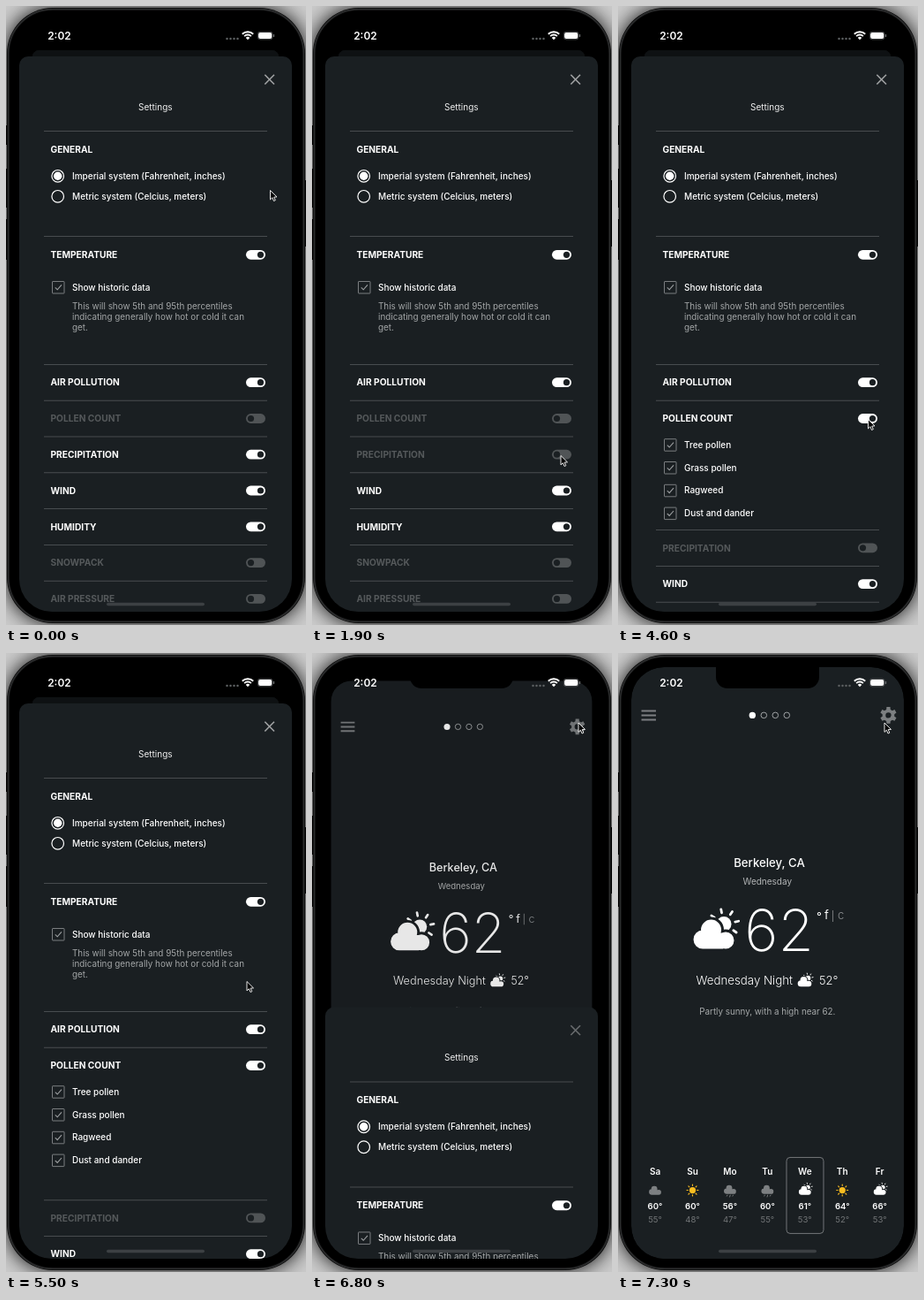
Animation, 340 px wide and 700 px high, one loop 8000 ms. Source, as an HTML page with a canvas:

```html
<!DOCTYPE html>
<html lang="en">
<head>
<meta charset="utf-8">
<title>Weather settings</title>
<style>
  html, body { margin: 0; width: 100%; height: 100%; overflow: hidden; background: #000; }
  canvas { display: block; width: 340px; height: 700px; }
</style>
</head>
<body>
<canvas id="stage"></canvas>
<script>
const W = 340, H = 700, LOOP = 8000, STEP = 100;
const BG = '#1a1f22', LINE = '#484c4f', OFF = '#55595b', GRAY = '#7c7f81', WHITE = '#fff';
const canvas = document.getElementById('stage');
const ctx = canvas.getContext('2d');
const dpr = window.devicePixelRatio || 1;
canvas.width = W * dpr;
canvas.height = H * dpr;

const clamp = v => Math.max(0, Math.min(1, v));
const lerp = (a, b, k) => a + (b - a) * k;
const smooth = k => k * k * (3 - 2 * k);

// Pointer tip: time, x, y
const pointer = [
  [200, 299, 208], [1100, 280, 507], [1300, 281.5, 508], [3800, 281.5, 508],
  [3900, 282, 495], [4000, 283, 479], [4100, 283, 467], [5400, 283, 467],
  [5500, 272.5, 371], [5600, 278, 265], [5700, 287, 175], [5800, 287, 175],
  [6200, 299, 73], [6400, 301.5, 78.5], [8000, 301.5, 78.5]
];
const presses = [[1700, 1900], [4200, 4400], [6600, 6700]];

function pointerAt(t) {
  if (t <= pointer[0][0]) return pointer[0].slice(1);
  const i = pointer.findIndex(p => p[0] >= t);
  const [t0, x0, y0] = pointer[i - 1], [t1, x1, y1] = pointer[i];
  const k = smooth((t - t0) / (t1 - t0));
  return [lerp(x0, x1, k), lerp(y0, y1, k)];
}

// Critically damped spring from 0 to 1
function spring(ms) {
  const u = Math.max(0, ms) * 0.0122;
  return 1 - (1 + u) * Math.exp(-u);
}

function text(s, x, y, size, weight = 500, color = WHITE, align = 'left') {
  ctx.font = `${weight} ${size}px Inter, sans-serif`;
  ctx.textAlign = align;
  ctx.fillStyle = color;
  ctx.fillText(s, x, y + size * 0.364);
}

function roundPath(x, y, w, h, r) {
  ctx.beginPath();
  ctx.roundRect(x, y, w, h, r);
}

function box(x, y, w, h, r, color) {
  roundPath(x, y, w, h, r);
  ctx.fillStyle = color;
  ctx.fill();
}

function disc(x, y, r, color) {
  ctx.beginPath();
  ctx.arc(x, y, r, 0, 7);
  ctx.fillStyle = color;
  ctx.fill();
}

function ring(x, y, r, color, width) {
  ctx.beginPath();
  ctx.arc(x, y, r, 0, 7);
  ctx.strokeStyle = color;
  ctx.lineWidth = width;
  ctx.stroke();
}

function stroke(points, color, width, cap = 'butt') {
  ctx.beginPath();
  points.forEach(([x, y]) => ctx.lineTo(x, y));
  ctx.strokeStyle = color;
  ctx.lineWidth = width;
  ctx.lineCap = cap;
  ctx.stroke();
}

const divider = y => box(43, y - 0.5, 253, 1, 0, LINE);

function toggle(y, on) {
  box(272, y - 5.4, 22, 10.8, 5.4, on ? WHITE : '#505456');
  disc(on ? 288.5 : 277.5, y, 3.6, BG);
}

function section(label, y, on) {
  text(label, 50.5, y, 10.2, 700, on ? WHITE : OFF);
  toggle(y, on);
}

function checkbox(label, y) {
  roundPath(52.5, y - 6.5, 13.5, 13.5, 0.5);
  ctx.strokeStyle = '#7b7e80';
  ctx.lineWidth = 1;
  ctx.stroke();
  stroke([[55.8, y + 0.4], [58.2, y + 2.8], [63, y - 2.6]], '#9b9ea0', 1.1);
  text(label, 75, y, 10);
}

function radio(label, y, on) {
  ring(58.7, y, 6.8, WHITE, 1.2);
  if (on) disc(58.7, y, 4.7, WHITE);
  text(label, 75, y, 10);
}

function drawSettings(t, offset) {
  ctx.save();
  ctx.translate(0, offset);
  box(15, 57, 309, 640, [10, 10, 0, 0], BG);
  const cross = t > 6600 ? '#696c6e' : '#a0a2a3';
  stroke([[293.3, 77.8], [304, 88.5]], cross, 1.6);
  stroke([[304, 77.8], [293.3, 88.5]], cross, 1.6);
  text('Settings', 169.3, 114, 10, 400, '#f0f0f0', 'center');

  divider(141.5);
  text('GENERAL', 50.5, 162, 10.2, 700);
  radio('Imperial system (Fahrenheit, inches)', 192.3, true);
  radio('Metric system (Celcius, meters)', 215.3, false);

  divider(260.5);
  section('TEMPERATURE', 281.3, true);
  checkbox('Show historic data', 318);
  ['This will show 5th and 95th percentiles', 'indicating generally how hot or cold it can', 'get.']
    .forEach((s, i) => text(s, 75, 339 + i * 12.4, 9.9, 400, '#a3a6a7'));

  divider(405.5);
  section('AIR POLLUTION', 425.7, true);
  divider(446.3);
  section('POLLEN COUNT', 466.5, t >= 4400);

  const grow = 131.7 * smooth(clamp((t - 4350) / 350));
  if (grow > 0) {
    ctx.save();
    ctx.beginPath();
    ctx.rect(15, 480, 309, grow + 6);
    ctx.clip();
    ['Tree pollen', 'Grass pollen', 'Ragweed', 'Dust and dander']
      .forEach((s, i) => checkbox(s, 496.2 + i * 25.8));
    ctx.restore();
  }
  const rest = [['PRECIPITATION', t < 1900], ['WIND', true], ['HUMIDITY', true],
    ['SNOWPACK', false], ['AIR PRESSURE', false]];
  rest.forEach(([label, on], i) => {
    const y = 507.2 + grow + i * 40.8;
    divider(y - 20.2);
    section(label, y, on);
  });
  ctx.restore();
}

function cloudPath(pad) {
  ctx.beginPath();
  [[-12.5, 6.5, 10.5], [-3, -4.5, 11.5], [13.5, 7.5, 9.5]].forEach(([x, y, r]) => {
    ctx.moveTo(x + r + pad, y);
    ctx.arc(x, y, r + pad, 0, 7);
  });
  ctx.rect(-12.5, -1 - pad, 23, 18 + 2 * pad);
}

function cloud(color) {
  cloudPath(0);
  ctx.fillStyle = color;
  ctx.fill();
}

function rays(x, y, from, to, count, first, color, width) {
  for (let i = 0; i < count; i++) {
    const a = first + i * Math.PI / 4, c = Math.cos(a), s = Math.sin(a);
    stroke([[x + c * from, y + s * from], [x + c * to, y + s * to]], color, width, 'round');
  }
}

const icons = {
  cloud() { cloud('#7d8082'); },
  rain() {
    ctx.translate(0, -3);
    cloud('#7d8082');
    [-10, 1, 12].forEach((x, i) =>
      stroke([[x, 21], [x - 2, 25 + i % 2 * 3]], '#7d8082', 3, 'round'));
  },
  sun() {
    disc(0, 0, 10, '#fbbd20');
    rays(0, 0, 14.5, 18, 8, 0, '#fbbd20', 3.2);
  },
  partly() {
    disc(11.5, -11, 8.5, WHITE);
    rays(11.5, -11, 13, 17, 5, -2.55, WHITE, 2.8);
    cloudPath(3);
    ctx.fillStyle = BG;
    ctx.fill();
    cloud(WHITE);
  }
};

function icon(name, x, y, scale) {
  ctx.save();
  ctx.translate(x, y);
  ctx.scale(scale, scale);
  icons[name]();
  ctx.restore();
}

function gear(x, y) {
  const tooth = Math.PI / 3;
  ctx.beginPath();
  for (let i = 0; i < 6; i++) {
    const mid = i * tooth + Math.PI / 6;
    [[-0.34, 6.9], [-0.22, 9.5], [0.22, 9.5], [0.34, 6.9]].forEach(([a, r]) =>
      ctx.lineTo(x + Math.cos(mid + a) * r, y + Math.sin(mid + a) * r));
  }
  ctx.closePath();
  ctx.moveTo(x + 3.2, y);
  ctx.arc(x, y, 3.2, 0, 7, true);
  ctx.fillStyle = GRAY;
  ctx.fill('evenodd');
}

const week = [
  ['Sa', 'cloud', 60, 55], ['Su', 'sun', 60, 48], ['Mo', 'rain', 56, 47], ['Tu', 'rain', 60, 55],
  ['We', 'partly', 61, 53], ['Th', 'sun', 64, 52], ['Fr', 'partly', 66, 53]
];

function drawHome(shown) {
  const scale = lerp(0.906, 1, shown);
  const corner = lerp(9, 37, shown);
  ctx.save();
  ctx.translate(169.5, 378);
  ctx.scale(scale, scale);
  ctx.translate(-169.5, -378);
  box(15, 16, 309, 669, corner, BG);

  [65.3, 70.3, 75.3].forEach(y => box(26.5, y - 1, 16.5, 2, 0, GRAY));
  disc(152.3, 70.3, 3.7, WHITE);
  [165.3, 178.3, 191.3].forEach(x => ring(x, 70.3, 3.3, '#a0a3a5', 1));
  gear(306.5, 70.3);

  text('Berkeley, CA', 171.5, 236.7, 13.2, 500, WHITE, 'center');
  text('Wednesday', 169.3, 258.3, 10, 400, '#b4b6b7', 'center');
  icon('partly', 108.5, 317.5, 1);
  text('62', 182.5, 313.6, 65.5, 200, WHITE, 'center');
  text('°', 225, 298, 13, 400);
  text('f', 234, 296.7, 13, 400);
  box(243, 291, 1, 13, 0, '#77797b');
  text('c', 249, 296.7, 13, 300, '#8d9092');
  text('Wednesday Night', 88.5, 370.5, 13.3, 300);
  icon('partly', 211.5, 371.5, 0.34);
  text('52°', 228, 370.5, 13, 300);
  text('Partly sunny, with a high near 62.', 169.3, 405.7, 9.8, 400, '#a5a8a9', 'center');

  week.forEach(([day, sky, high, low], i) => {
    const x = 42 + i * 42.45;
    text(day, x, 586.8, 10, 600, WHITE, 'center');
    icon(sky, x, 607.6, sky === 'sun' ? 0.36 : 0.3);
    text(high + '°', x, 626, 9.6, 600, WHITE, 'center');
    text(low + '°', x, 641, 9.6, 400, '#717476', 'center');
  });
  roundPath(191, 570.5, 42, 86, 4);
  ctx.strokeStyle = '#74777a';
  ctx.lineWidth = 1;
  ctx.stroke();

  box(15, 16, 309, 669, corner, `rgba(0,0,0,${0.45 * (1 - shown) ** 2})`);
  ctx.restore();
}

function drawPhone() {
  ctx.fillStyle = '#cbcbcb';
  ctx.fillRect(0, 0, W, H);
  ctx.save();
  ctx.shadowColor = 'rgba(0,0,0,0.95)';
  ctx.shadowBlur = 22 * dpr;
  box(1, 2, 338, 696, 52, '#070707');
  ctx.restore();
  [[0, 135, 22], [0, 184, 44], [0, 241, 46], [339, 197, 75]]
    .forEach(([x, y, h]) => box(x, y, 1, h, 0, '#080808'));
  roundPath(2.6, 3.6, 334.8, 692.8, 50.5);
  ctx.strokeStyle = '#2c2d2e';
  ctx.lineWidth = 1.6;
  ctx.stroke();
  box(4.5, 5.5, 331, 689, 48, '#000');
}

function drawStatus() {
  box(111, 12, 117, 28, [0, 0, 13, 13], '#000');
  text('2:02', 47.2, 33.5, 11.9, 600);
  for (let i = 0; i < 4; i++) disc(250.5 + i * 4, 37, 1.25, '#5d6062');
  [[8.8, 1.9], [5.5, 1.8]].forEach(([r, w]) => {
    ctx.beginPath();
    ctx.arc(274, 38, r, -Math.PI * 0.75, -Math.PI * 0.25);
    ctx.strokeStyle = WHITE;
    ctx.lineWidth = w;
    ctx.lineCap = 'butt';
    ctx.stroke();
  });
  ctx.beginPath();
  ctx.moveTo(274, 38.2);
  ctx.arc(274, 38.2, 3.2, -Math.PI * 0.75, -Math.PI * 0.25);
  ctx.fillStyle = WHITE;
  ctx.fill();
  roundPath(285.4, 29.2, 16.6, 8.6, 2.6);
  ctx.strokeStyle = '#56595b';
  ctx.lineWidth = 0.8;
  ctx.stroke();
  box(286.1, 29.9, 15.2, 7.2, 2, WHITE);
  box(303, 32, 1.1, 3, 0.5, '#707375');
}

function drawPointer(t) {
  const [x, y] = pointerAt(t);
  if (presses.some(([a, b]) => t >= a && t < b)) disc(x + 0.5, y + 1, 16.5, 'rgba(160,164,166,0.35)');
  ctx.save();
  ctx.translate(x + 0.5, y + 0.5);
  ctx.beginPath();
  [[0, 0], [0, 10.4], [2.4, 8.2], [4, 12], [5.8, 11.2], [4.2, 7.6], [7.5, 7.4]]
    .forEach(([px, py]) => ctx.lineTo(px, py));
  ctx.closePath();
  ctx.fillStyle = '#000';
  ctx.fill();
  ctx.strokeStyle = WHITE;
  ctx.lineWidth = 0.9;
  ctx.lineJoin = 'round';
  ctx.stroke();
  ctx.restore();
}

function draw(t) {
  const shown = spring(t - 6650);
  ctx.setTransform(dpr, 0, 0, dpr, 0, 0);
  drawPhone();
  ctx.save();
  roundPath(15, 16, 309, 669, 37);
  ctx.clip();
  drawHome(shown);
  drawSettings(t, 629 * shown);
  box(114, 674.7, 111, 3.6, 1.8, '#3c4043');
  ctx.restore();
  drawStatus();
  drawPointer(t);
}

const start = performance.now();
function tick() {
  const t = (performance.now() - start) % LOOP;
  draw(Math.floor(t / STEP) * STEP);
  requestAnimationFrame(tick);
}
tick();
</script>
</body>
</html>
```
